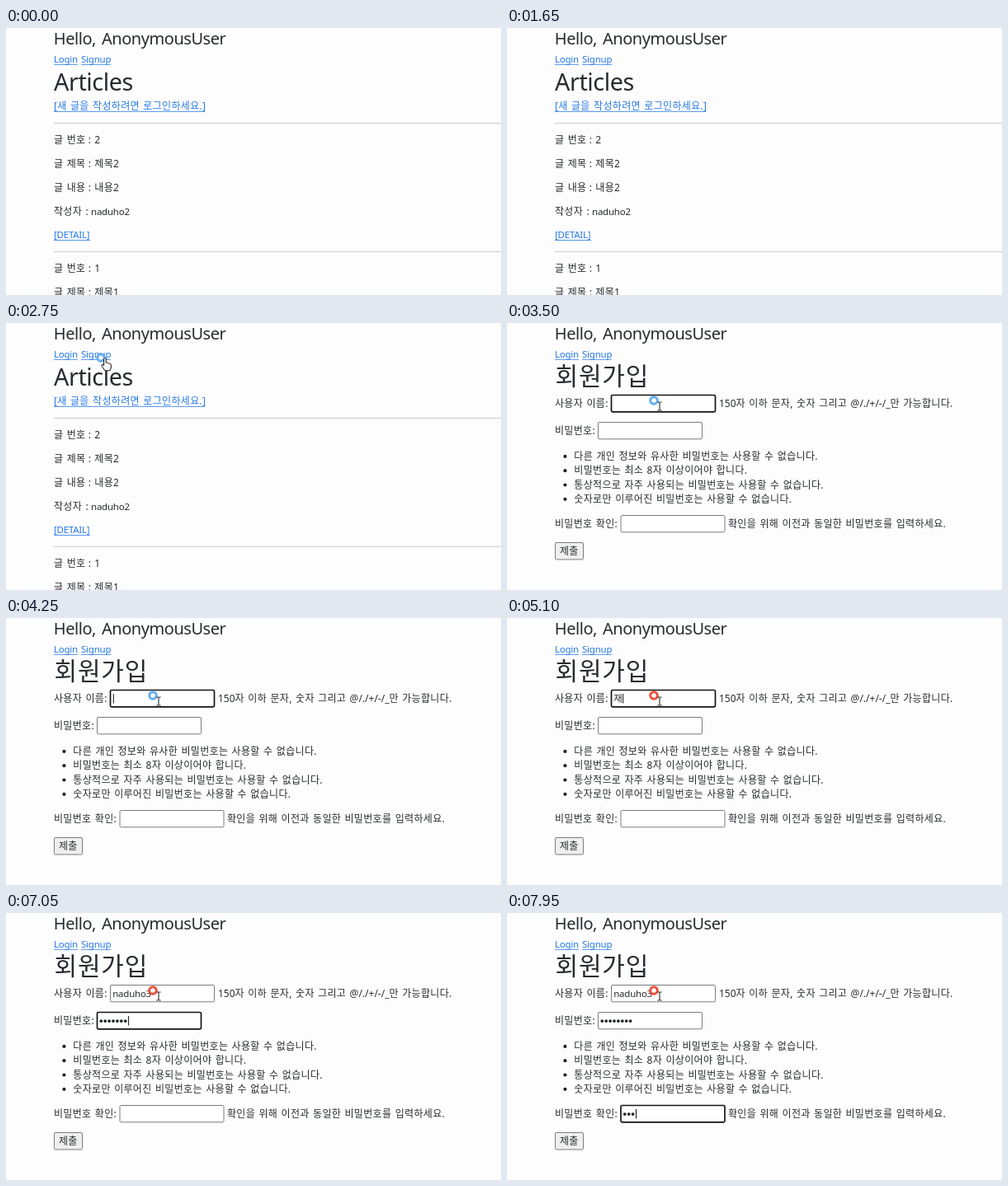
An HTML page that plays this animation: 600x324 px, repeating every 8000 ms.

```html
<!DOCTYPE html>
<html lang="ko">
<head>
<meta charset="utf-8">
<title>회원가입</title>
<style>
  html, body { margin: 0; width: 100%; height: 100%; overflow: hidden; background: #fefdfe; }
  svg { display: block; width: 100%; height: 100%; }
  text { font-family: "Noto Sans", "Noto Sans CJK KR", sans-serif; font-size: 11.5px; letter-spacing: -.02em; fill: #272b2f; }
  .ko { font-size: 12px; font-weight: 350; letter-spacing: .33px; word-spacing: .9px; }
  .lat { letter-spacing: 0; }
  .link { fill: #2479e4; }
  .rule { stroke: #2479e4; stroke-width: .8; }
  .hr { stroke: #c9c9cc; stroke-width: 1; }
  .box { fill: #fff; stroke: #7c7c7c; stroke-width: 1; }
  .box.focus { stroke: #141414; stroke-width: 1.7; }
</style>
</head>
<body>
<svg viewBox="0 0 600 324" xmlns="http://www.w3.org/2000/svg">
  <text x="57.8" y="20" style="font-size:20px;letter-spacing:-.45px;word-spacing:2.2px">Hello, AnonymousUser</text>
  <text class="link" x="58" y="42">Login</text>
  <text class="link" x="91" y="42">Signup</text>
  <path class="rule" d="M58 44.3H87M91 44.3H127"/>

  <g id="list">
    <text x="58" y="76" style="font-size:28.8px;letter-spacing:-.45px">Articles</text>
    <text class="ko link" x="58" y="99.3">[새 글을 작성하려면 로그인하세요.]</text>
    <path class="rule" d="M58 101.4H241"/>
  </g>

  <g id="form">
    <text x="58.5" y="75.2" style="font-size:30px;font-weight:350;letter-spacing:.8px">회원가입</text>
    <text class="ko" x="58" y="102">사용자 이름:</text>
    <text class="ko" x="257" y="102"><tspan class="lat">150</tspan>자 이하 문자, 숫자 그리고 <tspan class="lat">@/./+/-/_</tspan>만 가능합니다.</text>
    <text class="ko" x="58" y="134.7">비밀번호:</text>
    <text class="ko" x="58" y="248">비밀번호 확인:</text>
    <text class="ko" x="268" y="248">확인을 위해 이전과 동일한 비밀번호를 입력하세요.</text>
    <rect x="58.5" y="266.5" width="34" height="20.5" rx="1.5" fill="#efefef" stroke="#7c7c7c"/>
    <text class="ko" x="64" y="281">제출</text>
  </g>

  <path id="caret" stroke="#111" stroke-width="1"/>

  <g id="cursor">
    <circle id="ring" cx="-7" cy="-7" r="4.3" fill="#fff" fill-opacity=".75" stroke-width="3"/>
    <path id="arrow" d="M-2-6V7L1 4.3L3 8.8L5 7.9L3 3.5H7Z" fill="#fff" stroke="#111" stroke-width=".9"/>
    <path id="hand" d="M-3.4-5.5Q-2-7.6-.8-5.5V-.6Q.8-1.8 1.6-.2Q3-1 3.6.5Q5.2 0 5.3 2V5Q5 7 4 8.8H-2.2Q-3.5 6-6 3.2Q-6.6 1.2-4.8 1.5L-3.4 2.8Z" fill="#fff" stroke="#111" stroke-width="1"/>
    <path id="beam" d="M-2.5-5H-.6L0-4.4L.6-5H2.5M0-4.4V4.4M-2.5 5H-.6L0 4.4L.6 5H2.5" fill="none" stroke="#111" stroke-width="1"/>
  </g>
</svg>
<script>
const LOOP = 8000, SWITCH = 3000, RED = 4750;
const $ = id => document.getElementById(id);
const add = (parent, tag, attrs, text = '') => {
  const el = document.createElementNS('http://www.w3.org/2000/svg', tag);
  for (const k in attrs) el.setAttribute(k, attrs[k]);
  el.textContent = text;
  parent.append(el);
  return el;
};
const show = (el, on) => el.style.display = on ? '' : 'none';

// Article list
const list = $('list'), form = $('form');
function row(y, label, value, colon = 99.8, x = 107.3, cls = 'ko') {
  add(list, 'text', { class: 'ko', x: 58, y }, label);
  add(list, 'text', { class: 'ko', x: colon, y }, ':');
  add(list, 'text', { class: cls, x, y }, value);
}
function article(y, n) {
  add(list, 'path', { class: 'hr', d: `M58 ${y}H600` });
  row(y + 24.7, '글 번호', n);
  row(y + 53.5, '글 제목', '제목' + n);
  if (n < 2) return;
  row(y + 82.3, '글 내용', '내용' + n);
  row(y + 111.2, '작성자', 'naduho' + n, 96.5, 103, '');
  add(list, 'text', { class: 'link', x: 58, y: y + 139.7 }, '[DETAIL]');
  add(list, 'path', { class: 'rule', d: `M58 ${y + 142}H102` });
}
article(115.5, 2);
article(271.3, 1);

// Form
['다른 개인 정보와 유사한 비밀번호는 사용할 수 없습니다.',
 '비밀번호는 최소 8자 이상이어야 합니다.',
 '통상적으로 자주 사용되는 비밀번호는 사용할 수 없습니다.',
 '숫자로만 이루어진 비밀번호는 사용할 수 없습니다.'].forEach((line, i) => {
  const y = 165.9 + i * 17.3;
  add(form, 'circle', { cx: 70.4, cy: y - 4, r: 2.1, fill: '#212529' });
  add(form, 'text', { class: 'ko', x: 81.3, y }, line);
});

const PITCH = 4.9;
const fields = [[126.5, 87.5], [110.5, 120.5], [138, 233.5]].map(([x, y], i) => {
  const box = add(form, 'rect', { class: 'box', x, y, width: 126, height: 20.3, rx: 1.5 });
  const text = add(form, 'text', { x: x + 2.7, y: y + 14.5 });
  const dots = i ? Array.from({ length: 8 }, (_, k) =>
    add(form, 'circle', { cx: x + 4.8 + k * PITCH, cy: y + 10.6, r: 1.9, fill: '#212529' })) : [];
  return { x, y, box, text, dots };
});

// Keystrokes: [time, field, value]
const keys = [[SWITCH, 0, ''], [4950, 0, 'ㅈ'], [5050, 0, '재'], [5250, 0, '']];
const type = (start, gap, field, str) => {
  for (let i = 1; i <= str.length; i++) keys.push([start + (i - 1) * gap, field, str.slice(0, i)]);
};
type(5400, 100, 0, 'naduho3');
keys.push([6350, 1, '']);
type(6450, 100, 1, '********');
keys.push([7400, 2, '']);
type(7600, 150, 2, '***');

// Pointer path: [time, x, y]
const path = [[2150, 205, -14], [2550, 122, 49], [3080, 122, 49], [3430, 185, 101]];
function pointer(t) {
  let i = path.length - 1;
  while (i && path[i][0] > t) i--;
  const [t0, x0, y0] = path[i], [t1, x1, y1] = path[i + 1] || path[i];
  const p = t1 > t0 ? Math.max(0, (t - t0) / (t1 - t0)) : 0;
  const e = p * p * (3 - 2 * p);
  return [x0 + (x1 - x0) * e, y0 + (y1 - y0) * e];
}

function drawFields(t) {
  const values = ['', '', ''];
  let at = SWITCH, active = 0;
  for (const [time, field, value] of keys) {
    if (time > t) break;
    values[field] = value;
    active = field;
    at = time;
  }
  fields.forEach((f, i) => {
    f.box.classList.toggle('focus', i === active);
    if (!i) f.text.textContent = values[0];
    f.dots.forEach((d, k) => show(d, k < values[i].length));
  });
  const f = fields[active];
  const width = active ? values[active].length * PITCH : values[0] ? f.text.getComputedTextLength() : 0;
  $('caret').setAttribute('d', `M${f.x + 3.8 + width} ${f.y + 4.5}v11.5`);
  show($('caret'), t >= SWITCH && Math.floor((t - at) / 500) % 2 === 0);
}

function drawCursor(t) {
  const [x, y] = pointer(t);
  show($('cursor'), t >= path[0][0]);
  $('cursor').setAttribute('transform', `translate(${x} ${y})`);
  const onLink = x > 89 && x < 129 && y > 38 && y < 53;
  const onField = t >= SWITCH && y > 88;
  show($('hand'), onLink);
  show($('beam'), onField);
  show($('arrow'), !onLink && !onField);
  $('ring').setAttribute('stroke', t >= RED ? '#ee503a' : '#62aef0');
}

function draw(t) {
  show(list, t < SWITCH);
  show(form, t >= SWITCH);
  drawFields(t);
  drawCursor(t);
}

const start = performance.now();
(function tick() {
  draw((performance.now() - start) % LOOP);
  requestAnimationFrame(tick);
})();
</script>
</body>
</html>
```
